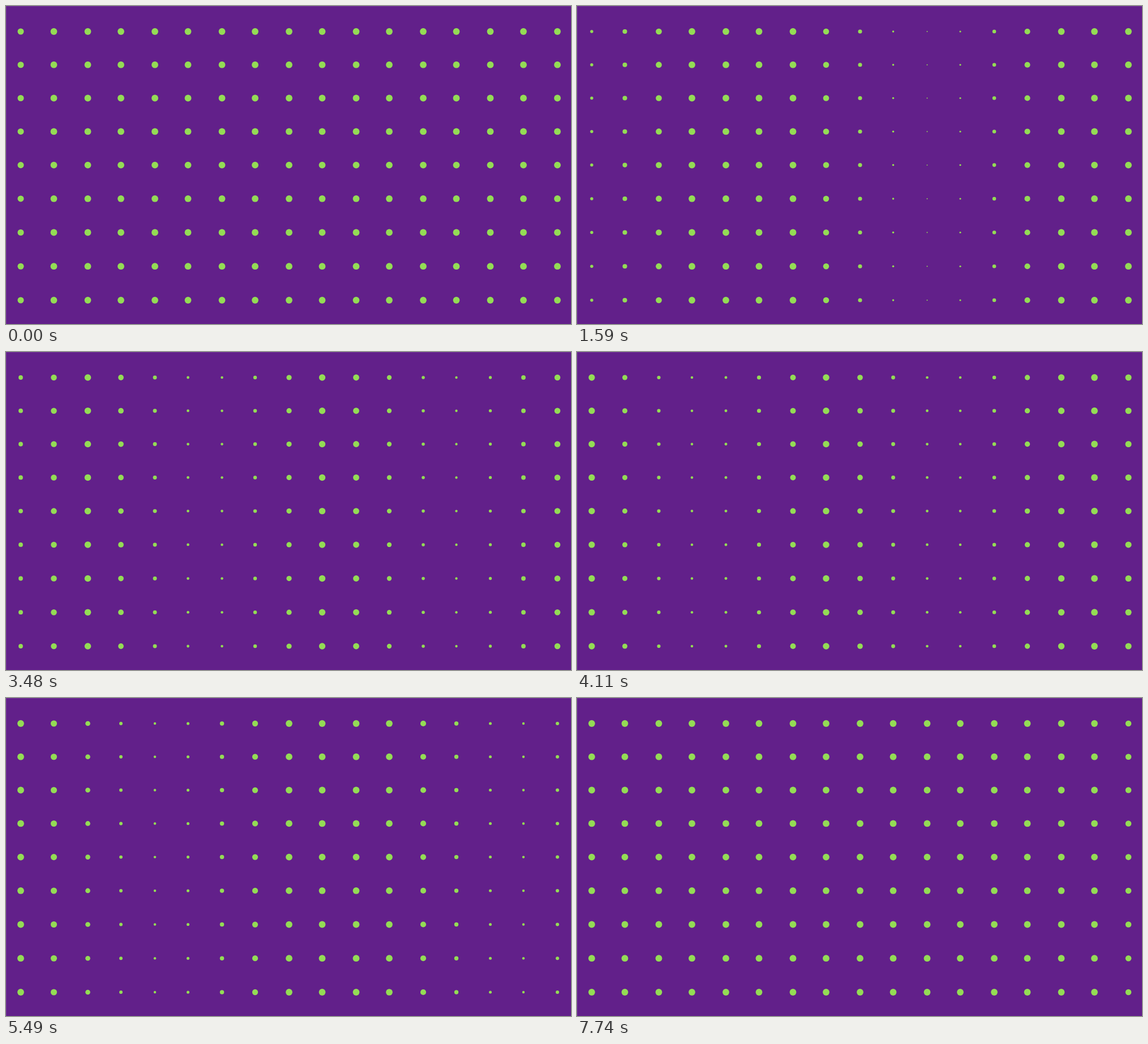
Recreate the animation shown at these times as an HTML page with a canvas. Size 998 px wide and 561 px high, loop 7.77 s.

```html
<!DOCTYPE html>
<html lang="en">
<head>
<meta charset="utf-8">
<title>Dot wave</title>
<style>
html, body { margin: 0; width: 100%; height: 100%; overflow: hidden; background: #62208a; }
canvas { display: block; }
</style>
</head>
<body>
<canvas id="stage" width="998" height="561"></canvas>
<script>
const ctx = document.getElementById('stage').getContext('2d');
const WIDTH = 998, HEIGHT = 561;
const LOOP = 7770, STEP = 30;
const COLS = 17, ROWS = 9, LAST = COLS - 1;
const FULL = 5.9;      // radius of a resting dot
const REACH = 4;       // half-width of a dip, in columns
const SHALLOW = 0.63, DEEP = 0.84;

// Dips that cross the grid from the first column to the last;
// a negative bend speeds up on the way, a positive one slows down.
const dips = [
  { from: 400, to: 2270, bend: -0.03, depth: DEEP },
  { from: 1760, to: 3790, bend: -0.23, depth: SHALLOW },
  { from: 2720, to: 4757, bend: -0.1, depth: SHALLOW },
  { from: 3710, to: 5640, bend: 0, depth: SHALLOW },
  { from: 4845, to: 6960, bend: -0.2, depth: SHALLOW },
  { from: 6190, to: 7470, bend: 0.07, depth: DEEP }
];

// Columns sit on a 1.5 px raster; rows bow slightly upwards.
const colX = i => 26 + 1.5 * Math.round(39.47 * i);
const rowY = j => 45 + 59.25 * j - 1.4 * Math.sin(Math.PI * j / (ROWS - 1));

function centre(dip, t) {
  const u = (t - dip.from) / (dip.to - dip.from);
  return LAST * (u + dip.bend * u * (1 - u));
}

function shrink(dip, col, t) {
  const d = Math.abs(col - centre(dip, t)) / REACH;
  return d < 1 ? 1 - dip.depth * Math.cos(d * Math.PI / 2) ** 2 : 1;
}

function draw(t) {
  ctx.fillStyle = '#62208a';
  ctx.fillRect(0, 0, WIDTH, HEIGHT);
  ctx.fillStyle = '#713695';
  ctx.fillRect(0, 0, WIDTH, 1);
  ctx.fillRect(0, 0, 1, HEIGHT);
  ctx.fillStyle = '#94dc55';
  for (let i = 0; i < COLS; i++) {
    const r = dips.reduce((size, dip) => size * shrink(dip, i, t), FULL);
    for (let j = 0; j < ROWS; j++) {
      ctx.beginPath();
      ctx.arc(colX(i), rowY(j), r, 0, Math.PI * 2);
      ctx.fill();
    }
  }
}

const start = performance.now();
function tick() {
  const t = (performance.now() - start) % LOOP;
  draw(Math.floor(t / STEP) * STEP);
  requestAnimationFrame(tick);
}
tick();
</script>
</body>
</html>
```
